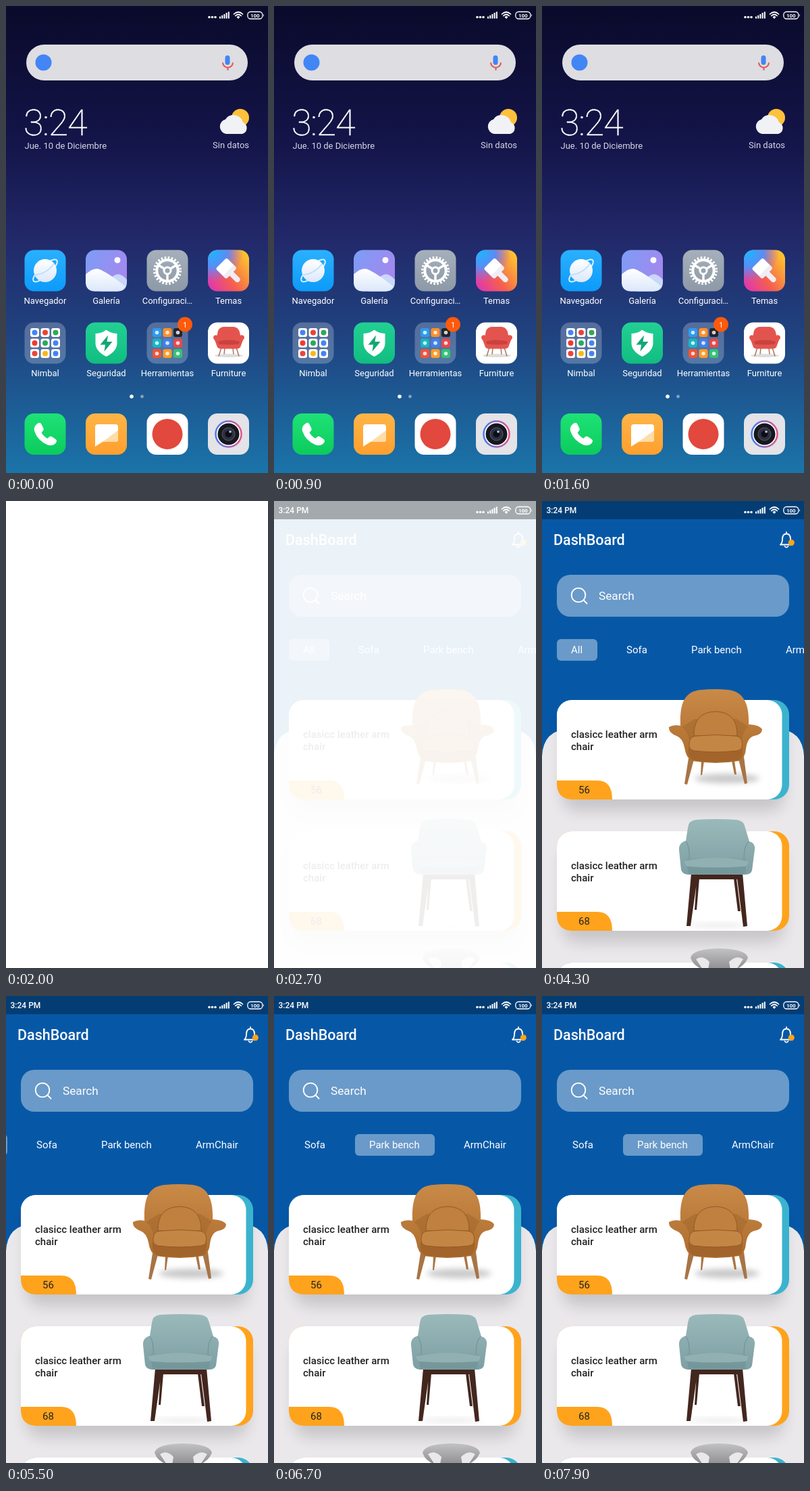
An HTML page that plays this animation: 388 by 690 pixels, repeating every 8000 ms.

```html
<!DOCTYPE html>
<html lang="es">
<head>
<meta charset="utf-8">
<title>Furniture app</title>
<style>
html, body { margin: 0; width: 100%; height: 100%; overflow: hidden; background: #fff; }
svg { display: block; width: 100vw; height: 100vh; font-family: Roboto, "Open Sans", sans-serif; }
.label { font-size: 13px; fill: #fff; text-anchor: middle; }
.tab { font-size: 15px; fill: #fff; }
.name { font-size: 15px; font-weight: 500; fill: #222; }
.num { font-size: 15px; fill: #222; text-anchor: middle; }
.w { fill: #fff; }
.line { fill: none; stroke: #fff; stroke-linecap: round; stroke-linejoin: round; }
</style>
</head>
<body>
<svg viewBox="0 0 388 690" preserveAspectRatio="none">
<defs>
  <linearGradient id="sky" x2="0" y2="1">
    <stop stop-color="#0a0a2b"/><stop offset=".3" stop-color="#14154a"/>
    <stop offset=".5" stop-color="#22296a"/><stop offset=".7" stop-color="#20427f"/>
    <stop offset="1" stop-color="#1a74a9"/>
  </linearGradient>
  <linearGradient id="blue" x2="0" y2="1"><stop stop-color="#2bb0ff"/><stop offset="1" stop-color="#0c9bfa"/></linearGradient>
  <linearGradient id="violet" x2="1" y2=".5"><stop stop-color="#7b9df6"/><stop offset="1" stop-color="#a488ee"/></linearGradient>
  <linearGradient id="gray" x2="0" y2="1"><stop stop-color="#a5b0bb"/><stop offset="1" stop-color="#8d99a6"/></linearGradient>
  <linearGradient id="warm" x1="0" y1=".9" x2="1" y2=".2">
    <stop stop-color="#e034b4"/><stop offset=".45" stop-color="#f5604e"/><stop offset="1" stop-color="#ffc52e"/>
  </linearGradient>
  <radialGradient id="cool" cx=".1" cy=".05" r=".75">
    <stop stop-color="#1eb4ff"/><stop offset=".5" stop-color="#5a8cf5"/><stop offset="1" stop-color="#a060e0" stop-opacity="0"/>
  </radialGradient>
  <linearGradient id="green" x2="0" y2="1"><stop stop-color="#22d094"/><stop offset="1" stop-color="#12bd80"/></linearGradient>
  <linearGradient id="call" x2="0" y2="1"><stop stop-color="#1ee276"/><stop offset="1" stop-color="#0ccb5d"/></linearGradient>
  <linearGradient id="amber" x2="0" y2="1"><stop stop-color="#ffb547"/><stop offset="1" stop-color="#ff9f2f"/></linearGradient>
  <linearGradient id="ring" x2="1" y2="0"><stop stop-color="#4a7cf0"/><stop offset="1" stop-color="#e0568c"/></linearGradient>
  <linearGradient id="snow" x2="0" y2="1"><stop stop-color="#fff"/><stop offset="1" stop-color="#dbe8fb"/></linearGradient>
  <linearGradient id="tan" x2="0" y2="1"><stop stop-color="#c98a48"/><stop offset="1" stop-color="#ad6c2d"/></linearGradient>
  <linearGradient id="sage" x2="0" y2="1"><stop stop-color="#9ab9ba"/><stop offset="1" stop-color="#7d9fa3"/></linearGradient>
  <linearGradient id="steel" x2="0" y2="1"><stop stop-color="#c2c2c4"/><stop offset="1" stop-color="#8f8f92"/></linearGradient>
  <filter id="soft" x="-30%" y="-60%" width="160%" height="220%"><feGaussianBlur stdDeviation="4"/></filter>
  <filter id="shade" x="-20%" y="-20%" width="140%" height="160%"><feGaussianBlur stdDeviation="11"/></filter>
  <g id="status">
    <g class="w">
      <circle cx="301" cy="16.5" r="1.8"/><circle cx="305.5" cy="16.5" r="1.8"/><circle cx="310" cy="16.5" r="1.8"/>
      <path d="M316 18.5v-3h2v3zM319.2 18.5v-4.8h2v4.8zM322.4 18.5v-6.6h2v6.6zM325.6 18.5v-8.4h2v8.4zM328.8 18.5v-10h2v10z"/>
      <path d="M341.5 16.2Q344 14 346.500 16.200L344 19z"/>
    </g>
    <path class="line" stroke-width="1.7" d="M337.500 12Q344 6 350.500 12M339.700 14.500Q344 10.500 348.300 14.500"/>
    <rect class="line" x="357.800" y="8.500" width="22" height="10.500" rx="4.500" stroke-width="1.300"/>
    <path class="w" d="M381 11.500q1.600 2.200 0 4.500z"/>
    <text x="368.800" y="16.700" class="w" font-size="8" font-weight="700" text-anchor="middle">100</text>
  </g>
</defs>

<g id="home">
  <rect width="388" height="690" fill="url(#sky)"/>
  <use href="#status"/>
  <rect x="30" y="57" width="328" height="53" rx="26.500" fill="#dedde2"/>
  <circle cx="55.500" cy="83.500" r="12" fill="#4285f4"/>
  <rect x="324.500" y="73" width="7" height="14" rx="3.500" fill="#4285f4"/>
  <path d="M321 83.500a7.500 7.500 0 0 0 15 0M328.500 91v4" fill="none" stroke="#e2574c" stroke-width="2"/>
  <text x="26" y="191" class="w" font-size="54" font-weight="100" letter-spacing="-1.200" stroke="#fff" stroke-width=".5">3:24</text>
  <text x="27.500" y="211" font-size="13" fill="#d5d6e6">Jue. 10 de Diciembre</text>
  <circle cx="347" cy="165" r="13" fill="#fec13c"/>
  <path fill="#f1f2f6" d="M326 189a11 11 0 0 1-1-21.500a14.500 14.500 0 0 1 26 4.500a9 9 0 0 1-1 17z"/>
  <text x="360" y="210" font-size="13" fill="#d5d6e6" text-anchor="end">Sin datos</text>
  <g id="apps"></g>
  <circle cx="186" cy="577" r="2.800" class="w"/><circle cx="201.500" cy="577" r="2.400" class="w" opacity=".45"/>
  <rect id="press" x="299" y="467" width="61" height="61" rx="14" opacity="0"/>
</g>

<rect id="splash" fill="#fff" x="299" y="467" width="61" height="61" rx="14" opacity="0"/>

<g id="dash" opacity="0">
  <rect width="388" height="690" fill="#0658a7"/>
  <text x="17" y="65" class="w" font-size="21.500" font-weight="500">DashBoard</text>
  <path class="line" stroke-width="1.800" d="M353 64.500Q356 62 356 56.500Q356 48.500 362 48.500Q368 48.500 368 56.500Q368 62 371 64.500zM362 48v-2M359.500 67Q362 70 364.500 67"/>
  <circle cx="369.300" cy="61.500" r="4.500" fill="#ffa31c"/>
  <rect x="22" y="109" width="344" height="62" rx="20" fill="#6a9ac9"/>
  <circle class="line" cx="54" cy="139" r="10.300" stroke-width="1.800"/>
  <path class="line" stroke-width="1.800" d="M61.500 146.500L66.500 151.500"/>
  <text x="84" y="146" class="w" font-size="17.200">Search</text>
  <g id="tabs">
    <rect id="chipAll" x="22" y="204" width="60" height="32" rx="6" fill="#6a9ac9"/>
    <rect id="chipPark" x="200" y="204" width="118" height="32" rx="6" fill="#6a9ac9" opacity="0"/>
    <text class="tab" x="43" y="225">All</text>
    <text class="tab" x="125" y="225">Sofa</text>
    <text class="tab" x="221" y="225">Park bench</text>
    <text class="tab" x="361" y="225">ArmChair</text>
  </g>
  <path fill="#eae8eb" d="M0 690V377Q2 338 40 337H348Q386 338 388 377V690z"/>
  <g id="cards"></g>
  <g>
    <ellipse cx="274" cy="410" rx="48" ry="7" fill="#777" opacity=".4" filter="url(#soft)"/>
    <path fill="#a87445" d="M217 380l8 2-10 37-4-1zM291 381l8-3 5 39-4 1zM236 384h4l-3 21h-2zM281 384h4l3 20h-3z"/>
    <path fill="url(#tan)" d="M205 332C204 300 210 281 236 279Q256 277 276 279C300 282 307 302 306 330Q322 331 326 337Q326 345 314 347Q304 350 302 366Q301 380 292 384Q257 390 222 384Q213 379 211 364Q208 350 199 347Q187 342 188 334Q195 330 205 332z"/>
    <path fill="#a5682d" opacity=".55" d="M207 334Q216 340 219 356H295Q298 340 305 333L288 322H226z"/>
    <path fill="#bf8040" stroke="#935a24" d="M225 347Q224 312 257 311Q290 312 289 347z"/>
    <path fill="#a2642a" d="M217 364H297Q298 382 289 383Q257 388 225 383Q215 380 217 364z"/>
    <path fill="#c48644" stroke="#935a24" d="M219 353Q221 347 231 347Q257 344 284 347Q294 347 296 354Q299 368 289 369Q257 373 225 369Q215 367 219 353z"/>
  </g>
  <g>
    <ellipse cx="262" cy="627" rx="46" ry="3" fill="#888" opacity=".2" filter="url(#soft)"/>
    <path fill="#43271f" d="M221 550h10l-11 78h-6zM288 550h9l7 78-6 1zM229 558h4l-4 46h-3zM284 558h4l6 48h-4zM222 551h74v8h-74z"/>
    <path fill="url(#sage)" d="M216 483Q217 472 228 471Q257 469 288 471Q299 472 301 483L307 503Q316 505 315 515L311 546Q309 552 300 552H216Q208 551 206 545L203 516Q202 505 213 502z"/>
    <path fill="#6f9297" d="M213 530Q257 524 303 530L301 551H217z" opacity=".6"/>
    <path fill="#90b0b2" d="M211 532Q257 522 305 532Q306 539 300 540Q257 543 216 540Q210 538 211 532z"/>
    <path fill="none" stroke="#6d9095" d="M213 503Q219 510 218 529M306 503Q299 510 299 529"/>
  </g>
  <g>
    <path fill="url(#steel)" d="M220 675Q222 662 262 661Q303 662 305 675Q300 687 287 692H238Q224 687 220 675z"/>
    <path fill="#e9e9eb" d="M228 677Q238 670 248 681L246 692H238zM298 677Q288 670 277 681L279 692H288z"/>
  </g>
</g>

<g id="bar" opacity="0">
  <rect width="388" height="27" opacity=".3"/>
  <text x="6.500" y="18.300" class="w" font-size="12" font-weight="500">3:24 PM</text>
  <use href="#status"/>
</g>
</svg>

<script>
const LOOP = 8000;
const $ = id => document.getElementById(id);
const cols = [27.5, 118, 208.5, 299];

// Each drawing sits on a 61 px tile with its corner at 0,0.
const tile = fill => `<rect width="61" height="61" rx="14" fill="${fill}"/>`;
const grid = draw => Array.from({ length: 9 }, (_, i) =>
  draw(8.5 + (i % 3) * 15.5, 8.5 + Math.floor(i / 3) * 15.5, i)).join('');
const folder = draw => tile('rgba(255,255,255,.24)') + grid(draw);

const pastel = ['#4285f4', '#ea4335', '#34a853', '#f03a30', '#2da95c', '#4285f4', '#ee4438', '#f9b915', '#4285f4'];
const tools = ['#2b9cf0', '#ff8f2d', '#23242a', '#16b6c8', '#3f82ee', '#e94848', '#f35336', '#ff9c26', '#35c274'];

const art = {
  planet: tile('url(#blue)') +
    `<g transform="rotate(-42 30.500 30.500)"><ellipse cx="30.500" cy="30.500" rx="23" ry="7.500" class="line" stroke-width="2" opacity=".85"/></g>
     <circle cx="30.500" cy="30.500" r="17" fill="url(#snow)"/>
     <path d="M15 37Q33 35 44 20" fill="none" stroke="#b8dcfa" stroke-width="1.500"/>`,
  hills: tile('url(#violet)') +
    `<circle cx="47" cy="15" r="4.500" fill="#fff" opacity=".95"/>
     <path fill="#c9d7fb" d="M22 61Q40 33 50 36Q56 38 61 44V47Q61 61 47 61z"/>
     <path fill="url(#snow)" d="M0 36Q11 26 19 28Q31 32 59 54Q55 61 47 61H14Q0 61 0 47z"/>`,
  gear: tile('url(#gray)') +
    `<g fill="none" stroke="#fff"><circle cx="30.500" cy="30.500" r="19.300" stroke-width="3.500" stroke-dasharray="2.530"/>
     <circle cx="30.500" cy="30.500" r="15.700" stroke-width="4"/><circle cx="30.500" cy="30.500" r="5" stroke-width="3"/>
     <path stroke-width="3.500" d="M30.500 35.500V46M26.500 28L17.500 22.500M34.500 28L43.500 22.500"/></g>`,
  brush: tile('url(#warm)') + tile('url(#cool)') +
    `<g transform="rotate(-45 30.500 30.500)"><rect x="19" y="15" width="23" height="17" rx="3" class="w"/>
     <path fill="#f1edf5" d="M19 30H42V34Q42 37 38 37H34.500V49Q34.500 53 30.500 53Q26.500 53 26.500 49V37H23Q19 37 19 34z"/></g>`,
  pack: folder((x, y, i) =>
    `<rect x="${x}" y="${y}" width="13" height="13" rx="3" class="w"/><circle cx="${x + 6.5}" cy="${y + 6.5}" r="4" fill="${pastel[i]}"/>`),
  shield: tile('url(#green)') +
    `<path class="w" d="M30.500 11Q37 16 46.500 16.500V31Q46 43 30.500 50.500Q15 43 14.500 31V16.500Q24 16 30.500 11z"/>
     <path fill="#12a777" d="M33 19L21.500 33H29L27.500 43L39.500 28.500H31.500z"/>`,
  tools: folder((x, y, i) =>
    `<rect x="${x}" y="${y}" width="13" height="13" rx="3" fill="${tools[i]}"/><circle cx="${x + 6.5}" cy="${y + 6.5}" r="2.800" fill="#fff" opacity=".8"/>`) +
    `<circle cx="56.500" cy="3" r="11" fill="#ff5a0c"/><text x="56.500" y="7" class="w" font-size="11" text-anchor="middle">1</text>`,
  chair: tile('#fff') +
    `<ellipse cx="31" cy="49" rx="21" ry="2.500" fill="#ddd"/>
     <path d="M20 37L16 50M42 37L46 50M25 38L24 47M37 38L38 47" stroke="#a9785c" stroke-width="1.500"/>
     <path fill="#e4544f" d="M14 19Q14 7 24 6.500H38Q47 7 48 19Q54 18 54 23Q51 27 49 34Q48 39 42 39H20Q14 39 13 34Q11 27 8 23Q8 18 14 19z"/>
     <path fill="#c9423f" d="M15 28Q31 24 47 28L46 32Q31 34 16 32z"/>`,
  phone: tile('url(#call)') +
    `<path class="w" d="M19 15Q23 12 25 16L28 22Q29 25 25 28Q28 34 34 37Q37 33 40 34L46 38Q49 40 46 44Q41 49 34 46.500Q19 40 14.500 26Q13 19 19 15z"/>`,
  bubble: tile('url(#amber)') +
    `<path class="w" d="M18 16H44Q48 16 48 20V38Q48 42 44 42H25L14 49V20Q14 16 18 16z"/>
     <path fill="#ffdca8" d="M48 25V38Q48 42 44 42H25z"/>`,
  disc: tile('#fff') + '<circle cx="30.500" cy="30.500" r="22.500" fill="#e2483d"/>',
  camera: tile('#e3e3e8') +
    `<circle cx="30.500" cy="30.500" r="19" fill="#fff" stroke="url(#ring)" stroke-width="2.500"/>
     <circle cx="30.500" cy="30.500" r="16" fill="#17181e"/><circle cx="30.500" cy="30.500" r="9.500" fill="#2c3040" stroke="#555b70"/>
     <circle cx="30.500" cy="30.500" r="5" fill="#0d0e14"/><circle cx="33" cy="27" r="1.800" fill="#b9c5ea"/>`
};

const rows = [
  [360.5, ['planet', 'Navegador'], ['hills', 'Galería'], ['gear', 'Configuraci…'], ['brush', 'Temas']],
  [467.5, ['pack', 'Nimbal'], ['shield', 'Seguridad'], ['tools', 'Herramientas'], ['chair', 'Furniture']],
  [602, ['phone'], ['bubble'], ['disc'], ['camera']]
];
$('apps').innerHTML = rows.map(([y, ...apps]) => apps.map(([icon, label = ''], i) =>
  `<g transform="translate(${cols[i]} ${y})">${art[icon]}<text class="label" x="30.500" y="79.500">${label}</text></g>`
).join('')).join('');

const card = (y, color, count) => `<g transform="translate(22 ${y})">
  <rect x="8" y="22" width="328" height="142" rx="22" opacity=".15" filter="url(#shade)"/>
  <rect width="344" height="147" rx="22" fill="${color}"/>
  <rect width="333.500" height="147" rx="22" class="w"/>
  <path fill="#ffa31c" d="M0 119H60Q82 119 82 147H22Q1 146 0 125z"/>
  <text class="name" x="21" y="56">clasicc leather arm</text><text class="name" x="21" y="73.500">chair</text>
  <text class="num" x="40.500" y="138">${count}</text></g>`;
$('cards').innerHTML = card(294, '#3bb3cf', 56) + card(488, '#ffa31c', 68) + card(682, '#3bb3cf', 72);

// Steps are [ms, styles, easing to the next step].
function play(id, steps) {
  const frames = steps.map(([t, style, easing = 'linear']) => ({ offset: t / LOOP, easing, ...style }));
  frames.unshift({ ...frames[0], offset: 0, easing: 'step-end' });
  frames.push({ ...frames[frames.length - 1], offset: 1 });
  $(id).animate(frames, { duration: LOOP, iterations: Infinity });
}
const fade = (...steps) => steps.map(([t, opacity, easing]) => [t, { opacity }, easing]);
const box = (x, y, width, height, rx, opacity) =>
  ({ x: x + 'px', y: y + 'px', width: width + 'px', height: height + 'px', rx: rx + 'px', opacity });
const shift = x => ({ transform: `translateX(${x}px)` });
const HOLD = 'step-end';

play('press', fade([1650, 0], [1750, .25], [1900, 0]));
play('splash', [
  [1799, box(299, 467, 61, 61, 14, 0), HOLD],
  [1800, box(299, 467, 61, 61, 14, .6), 'ease-out'],
  [1990, box(0, 0, 388, 690, 0, 1)]
]);
play('dash', fade([2500, 0], [2600, .03], [2700, .08], [2800, .25], [2900, .6], [3000, .9], [3100, 1]));
play('bar', fade([2499, 0, HOLD], [2500, 1]));
play('tabs', [[4300, shift(0), 'cubic-bezier(.3,0,.2,1)'], [4900, shift(-80)]]);
play('chipAll', fade([6599, 1, HOLD], [6600, 0]));
play('chipPark', fade([6599, 0, HOLD], [6600, 1]));
</script>
</body>
</html>
```
